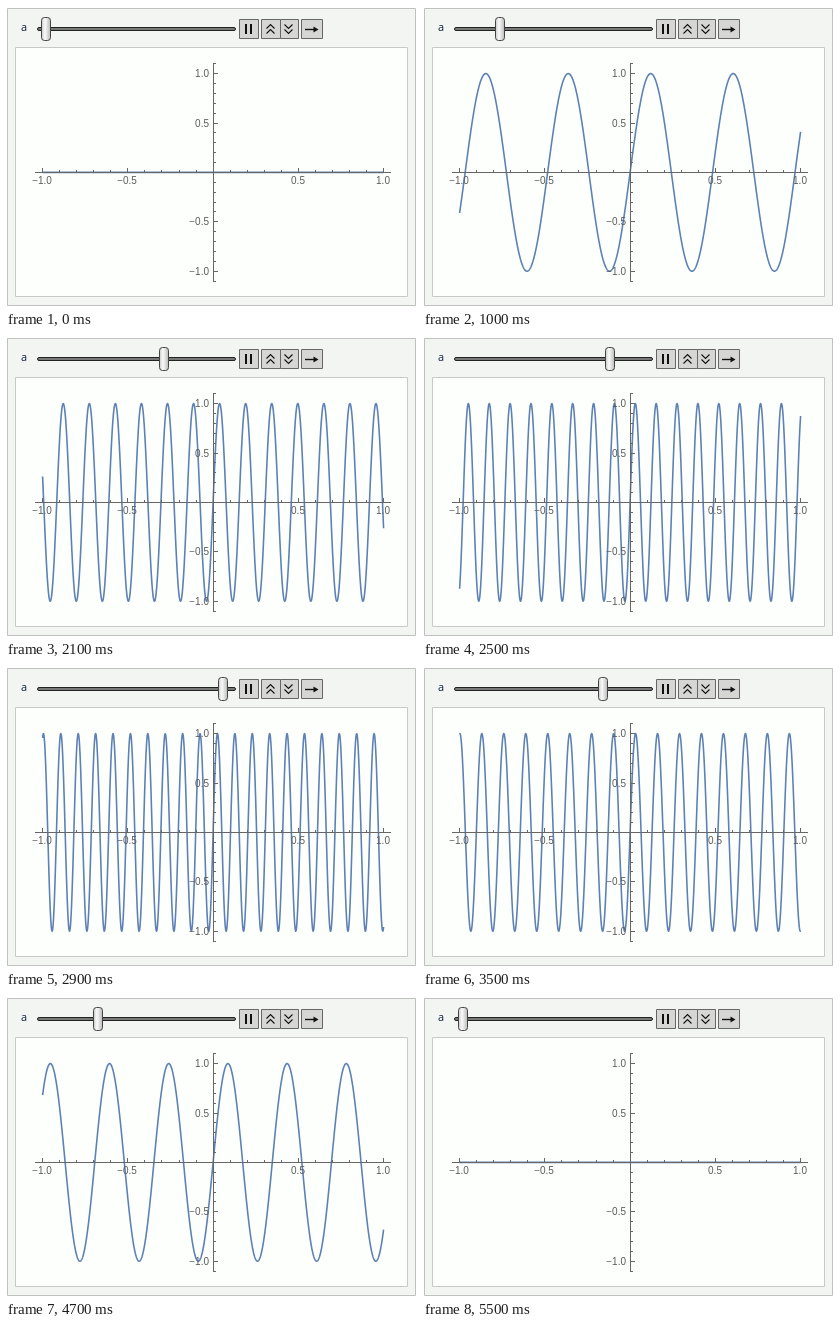
Recreate the animation shown at these times as an HTML page with a canvas. Size 411 px wide and 302 px high, loop 6 s.

```html
<!DOCTYPE html>
<html lang="en">
<head>
<meta charset="utf-8">
<title>Sine frequency slider</title>
<style>
  html, body { margin: 0; width: 100%; height: 100%; overflow: hidden; background: #fff; }
  canvas { display: block; }
</style>
</head>
<body>
<canvas id="stage" width="411" height="302"></canvas>
<script>
const ctx = document.getElementById('stage').getContext('2d');
const LOOP = 6000;
const MAX_A = 20 * Math.PI;
const STEP_A = 2.556;
const ORIGIN = { x: 207.1, y: 166.4 };
const UNIT = { x: 170.5, y: 98.8 };

const toX = x => ORIGIN.x + x * UNIT.x;
const toY = y => ORIGIN.y - y * UNIT.y;

function box(x, y, w, h, fill, stroke, radius = 0) {
  ctx.beginPath();
  ctx.roundRect(x + 0.5, y + 0.5, w - 1, h - 1, radius);
  ctx.fillStyle = fill;
  ctx.fill();
  ctx.strokeStyle = stroke;
  ctx.lineWidth = 1;
  ctx.stroke();
}

function line(points, color, width) {
  ctx.beginPath();
  points.forEach(([x, y]) => ctx.lineTo(x, y));
  ctx.strokeStyle = color;
  ctx.lineWidth = width;
  ctx.stroke();
}

function text(str, x, y, font, color, align) {
  ctx.font = font;
  ctx.fillStyle = color;
  ctx.textAlign = align;
  ctx.fillText(str, x, y);
}

function drawPanel() {
  ctx.fillStyle = '#fff';
  ctx.fillRect(0, 0, 411, 302);
  box(1, 2, 409, 298, '#f3f5f2', '#bfc1be');
  box(9, 41, 393, 250, '#fdfffc', '#c8cac7');
}

function drawSlider(a) {
  text('a', 15, 25, '11px "Open Sans", "Noto Sans", sans-serif', '#10203c', 'left');
  box(31, 21, 199, 4, '#777', '#222', 1.5);

  const x = Math.round(40 + a / MAX_A * 180.3) - 5;
  const shade = ctx.createLinearGradient(x, 0, x + 10, 0);
  shade.addColorStop(0, '#c4c4c4');
  shade.addColorStop(0.4, '#fafafa');
  shade.addColorStop(1, '#b4b4b4');
  box(x, 11, 10, 24, shade, '#444', 3);
}

function drawButtons() {
  const ink = '#111';
  for (const [x, w] of [[233, 20], [255, 20], [274, 19], [295, 22]]) {
    box(x, 13, w, 20, '#d6d7d5', '#666');
  }
  ctx.fillStyle = ink;
  ctx.fillRect(239, 18, 2, 10);
  ctx.fillRect(244, 18, 2, 10);
  for (const [x, dir] of [[264.5, -1], [282.5, 1]]) {
    for (const y of [20.5, 25.5]) {
      line([[x - 4, y - 2 * dir], [x, y + 2 * dir], [x + 4, y - 2 * dir]], ink, 1.1);
    }
  }
  line([[299, 23.5], [310, 23.5]], ink, 1.4);
  ctx.fillStyle = ink;
  ctx.beginPath();
  ctx.moveTo(312.5, 23.5);
  ctx.lineTo(307.5, 20.5);
  ctx.lineTo(307.5, 26.5);
  ctx.fill();
}

function drawCurve(a) {
  const points = [];
  for (let i = 0; i <= 1400; i++) {
    const x = i / 700 - 1;
    points.push([toX(x), toY(Math.sin(a * x))]);
  }
  ctx.lineJoin = 'round';
  line(points, '#5e81b5', 1.6);
  ctx.lineJoin = 'miter';
}

function drawAxes() {
  const font = '10px "Liberation Sans", Arial, sans-serif';
  ctx.fillStyle = '#666';
  ctx.fillRect(29, 166, 356, 1);
  ctx.fillRect(207, 57, 1, 219);

  for (let i = -11; i <= 11; i++) {
    const major = i % 5 === 0;
    const size = major ? 4 : 2;
    const value = i / 10;
    const x = Math.floor(toX(value));
    const y = Math.floor(toY(value));
    ctx.fillStyle = '#666';
    if (Math.abs(i) <= 10) ctx.fillRect(x, 166 - size, 1, size);
    ctx.fillRect(208, y, size, 1);
    if (major && i) {
      const label = (i < 0 ? '\u2212' : '') + Math.abs(value).toFixed(1);
      text(label, x, 178, font, '#5c5c5c', 'center');
      text(label, 203, y + 4, font, '#5c5c5c', 'right');
    }
  }
}

function valueAt(time) {
  const step = time < 500 ? 0 : Math.min(51, Math.floor((time - 400) / 100));
  return Math.max(0, MAX_A - STEP_A * Math.abs(step - 25.5));
}

function render(time) {
  const a = valueAt(time);
  drawPanel();
  drawSlider(a);
  drawButtons();
  drawCurve(a);
  drawAxes();
}

const start = performance.now();
function tick() {
  render((performance.now() - start) % LOOP);
  requestAnimationFrame(tick);
}
tick();
</script>
</body>
</html>
```
